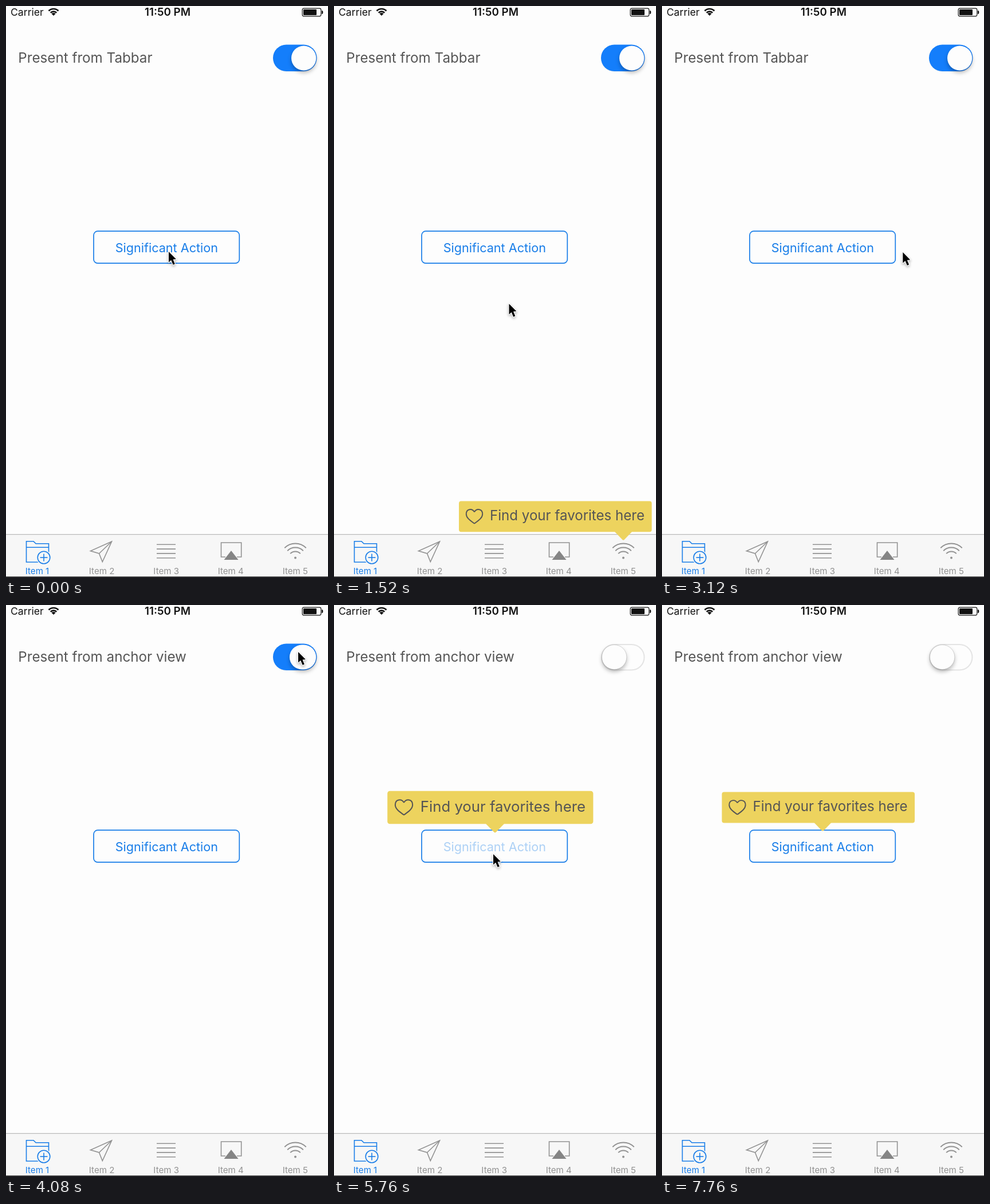
Animation of 562 by 997 pixels, one loop 7.84 s. Source, as an HTML page with a canvas:

```html
<!DOCTYPE html>
<html lang="en">
<head>
<meta charset="utf-8">
<title>Tooltip demo</title>
<style>
  html, body { margin: 0; width: 100%; height: 100%; overflow: hidden; background: #fdfdfd; }
  canvas { display: block; width: 562px; height: 997px; }
</style>
</head>
<body>
<canvas id="stage" width="562" height="997"></canvas>
<script>
const ctx = document.getElementById('stage').getContext('2d');
const LOOP = 7840, STEP = 80;
const FONT = 'Inter, "Liberation Sans", sans-serif';
const BLUE = '#187de8', GREY = '#929292', INK = '#555555', PAPER = '#fdfdfd', BAR = '#f7f7f7';
const YELLOW = '#edd35e', BLACK = '#111';

const FIRST_SHOW = 440, FIRST_HIDE = 2450, SECOND_SHOW = 5560;
const TOGGLE = 4070;

const clamp = v => Math.max(0, Math.min(1, v));
const mix = (a, b, k) => a + (b - a) * k;
const smooth = k => { k = clamp(k); return k * k * (3 - 2 * k); };
const easeIn = k => k * k;
const easeOut = k => k * (2 - k);

function spring(ms) {
  if (ms <= 0) return 0;
  const s = ms / 1000, decay = 13.5, freq = 15.7;
  return 1 - Math.exp(-decay * s) * (Math.cos(freq * s) + decay / freq * Math.sin(freq * s));
}

// Each move is one eased quadratic curve from the previous resting place
const REST = [284, 429];
const MOVES = [
  { start: 1360, end: 1910, bend: [340, 651], to: [362, 874], ease: smooth },
  { start: 2876, end: 3600, bend: [386, 478], to: [510, 82], ease: easeOut },
  { start: 4660, end: 5200, bend: [286, 562], to: [278, 435], ease: smooth },
  { start: 6640, end: 7080, bend: [341, 186], to: [520, -60], ease: easeIn }
];

function pointerAt(t) {
  let at = REST;
  for (const { start, end, bend, to, ease } of MOVES) {
    const k = ease(clamp((t - start) / (end - start)));
    at = at.map((v, i) => mix(mix(v, bend[i], k), mix(bend[i], to[i], k), k));
    if (t < end) break;
  }
  return at;
}

function text(str, x, y, size, color, align = 'left', weight = 400) {
  ctx.font = `${weight} ${size}px ${FONT}`;
  ctx.textAlign = align;
  ctx.fillStyle = color;
  ctx.fillText(str, x, y);
}

function poly(points, closed = true) {
  ctx.beginPath();
  points.forEach(([x, y]) => ctx.lineTo(x, y));
  if (closed) ctx.closePath();
}

function box(x, y, w, h, r) {
  ctx.beginPath();
  ctx.roundRect(x, y, w, h, r);
}

function circle(x, y, r) {
  ctx.beginPath();
  ctx.arc(x, y, r, 0, Math.PI * 2);
}

function stroke(color, width = 1.6) {
  ctx.strokeStyle = color;
  ctx.lineWidth = width;
  ctx.stroke();
}

function fill(color) {
  ctx.fillStyle = color;
  ctx.fill();
}

function line(x1, y1, x2, y2, color) {
  poly([[x1, y1], [x2, y2]], false);
  stroke(color);
}

function fan(x, y, r, color, width) {
  ctx.beginPath();
  ctx.arc(x, y, r, -Math.PI * 0.75, -Math.PI * 0.25);
  stroke(color, width);
}

function shadow(color, blur, dy) {
  ctx.shadowColor = color;
  ctx.shadowBlur = blur;
  ctx.shadowOffsetY = dy;
}

function statusBar() {
  text('Carrier', 8, 17, 17.6, BLACK);
  text('11:50 PM', 282, 17.3, 18.8, BLACK, 'center', 600);
  for (const r of [12, 7.4, 2.5]) fan(83, 17, r, BLACK, r < 5 ? 5 : 2.7);
  box(517.2, 4.2, 32.6, 13.6, 2.5);
  stroke(BLACK, 1.2);
  box(519, 6, 23, 10, 1);
  fill(BLACK);
  box(551, 8, 2.3, 6, [0, 2, 2, 0]);
  fill(BLACK);
}

function toggleSwitch(t) {
  const off = smooth((t - TOGGLE) / 300);
  box(467, 69, 74.5, 44.5, 22.2);
  fill(PAPER);
  stroke('#e4e4e4', 2);
  ctx.globalAlpha = 1 - off;
  box(466, 67.5, 76.5, 46.5, 23.2);
  fill('#147efb');
  ctx.globalAlpha = 1;

  const stretch = 3 * smooth((t - TOGGLE + 120) / 80) * (1 - off);
  box(mix(498, 467.5, off) - stretch, 69.5, 43.3 + stretch, 43, 21.5);
  ctx.save();
  shadow('rgba(0,0,0,0.28)', 7, 4);
  fill(PAPER);
  ctx.restore();
  stroke(`rgba(0,0,0,${0.14 * off})`, 1);
}

function actionButton(t) {
  const since = t - (t < FIRST_HIDE ? FIRST_SHOW : SECOND_SHOW);
  box(153, 393.2, 254.3, 56, 7);
  stroke(BLUE, 1.7);
  ctx.globalAlpha = since < -160 ? 1 : mix(0.35, 1, smooth((since - 200) / 80));
  text('Significant Action', 280.3, 429.5, 21.6, BLUE, 'center');
  ctx.globalAlpha = 1;
}

function folderIcon() {
  poly([[35.5, 971], [35.5, 934.7], [48, 934.7], [52, 938.8], [74.5, 938.8], [74.5, 971]]);
  stroke(BLUE);
  line(35.5, 945.3, 74.5, 945.3, BLUE);
  circle(66, 963, 13);
  fill(BAR);
  circle(66, 963, 10.8);
  stroke(BLUE);
  line(59.5, 963, 72.5, 963, BLUE);
  line(66, 956.5, 66, 969.5, BLUE);
}

function planeIcon() {
  poly([[184.5, 935], [147.5, 951.5], [162.5, 956], [168.3, 970.5]]);
  stroke(GREY);
  line(162.5, 956, 184.5, 935, GREY);
}

function listIcon() {
  for (let y = 940.3; y < 965; y += 7.8) line(263, y, 296, y, GREY);
}

function screenIcon() {
  poly([[383, 962], [375.5, 962], [375.5, 937], [410.7, 937], [410.7, 962], [403, 962]], false);
  stroke(GREY);
  poly([[393, 951], [380.5, 967], [405.5, 967]]);
  fill('#858585');
}

function wifiIcon() {
  for (let r = 26.5; r > 10; r -= 7) fan(505, 965, r, GREY, 1.9);
  circle(505, 963.5, 2);
  fill(GREY);
}

function tabBar() {
  ctx.fillStyle = BAR;
  ctx.fillRect(0, 922, 562, 75);
  ctx.fillStyle = '#bcbcbc';
  ctx.fillRect(0, 922, 562, 1.3);
  [folderIcon, planeIcon, listIcon, screenIcon, wifiIcon].forEach((icon, i) => {
    icon();
    text(`Item ${i + 1}`, 54.5 + i * 112.6, 991.7, 15.1, i ? GREY : BLUE, 'center');
  });
  ctx.fillStyle = '#444';
  ctx.fillRect(0, 996, 562, 1);
}

function heart(x, y) {
  ctx.beginPath();
  for (const side of [-1, 1]) {
    ctx.moveTo(x, y + 24.5);
    ctx.bezierCurveTo(x + side * 6, y + 20, x + side * 14.2, y + 15, x + side * 14.2, y + 8);
    ctx.bezierCurveTo(x + side * 14.2, y - 1.5, x + side * 4, y - 2.5, x, y + 4.2);
  }
  ctx.lineJoin = 'round';
  stroke(INK, 1.9);
  ctx.lineJoin = 'miter';
}

function tooltip(x, y, tip, scale, alpha) {
  if (scale <= 0 || alpha <= 0) return;
  const w = 336.6, h = 53.8;
  ctx.save();
  ctx.globalAlpha = alpha;
  ctx.translate(x + w / 2, y + h / 2);
  ctx.scale(scale, scale);
  ctx.translate(-w / 2, -h / 2);
  box(0, 0, w, h, 4);
  fill(YELLOW);
  poly([[tip - 15, h - 0.3], [tip + 15, h - 0.3], [tip + 1, 68], [tip - 1, 68]]);
  fill(YELLOW);
  heart(27, 14.7);
  text('Find your favorites here', 54, 33.5, 24.1, INK);
  ctx.restore();
}

function tooltips(t) {
  const hide = smooth((t - FIRST_HIDE) / 260);
  const first = spring(t - FIRST_SHOW);
  tooltip(218, 864.5, 287, first * mix(1, 0.1, hide), clamp(first) * (1 - hide));
  const second = spring(t - SECOND_SHOW);
  tooltip(104.5, 326.6, 176, second, clamp(second));
}

function pointer(t) {
  ctx.save();
  ctx.translate(...pointerAt(t));
  ctx.scale(0.95, 0.95);
  poly([[0, 0], [0, 19.5], [4.4, 15.6], [8, 24], [11.4, 22.5], [7.9, 14.3], [13.6, 13.8]]);
  ctx.lineJoin = 'round';
  shadow('rgba(0,0,0,0.35)', 4, 2);
  stroke('#fff', 2.4);
  shadow('transparent', 0, 0);
  fill('#000');
  ctx.restore();
}

function draw(t) {
  ctx.fillStyle = PAPER;
  ctx.fillRect(0, 0, 562, 997);
  statusBar();
  text(`Present from ${t < TOGGLE ? 'Tabbar' : 'anchor view'}`, 21.3, 99, 24.2, INK);
  toggleSwitch(t);
  actionButton(t);
  tabBar();
  tooltips(t);
  pointer(t);
}

const start = performance.now();
function tick() {
  const t = (performance.now() - start) % LOOP;
  draw(Math.floor(t / STEP) * STEP);
  requestAnimationFrame(tick);
}
tick();
</script>
</body>
</html>
```
